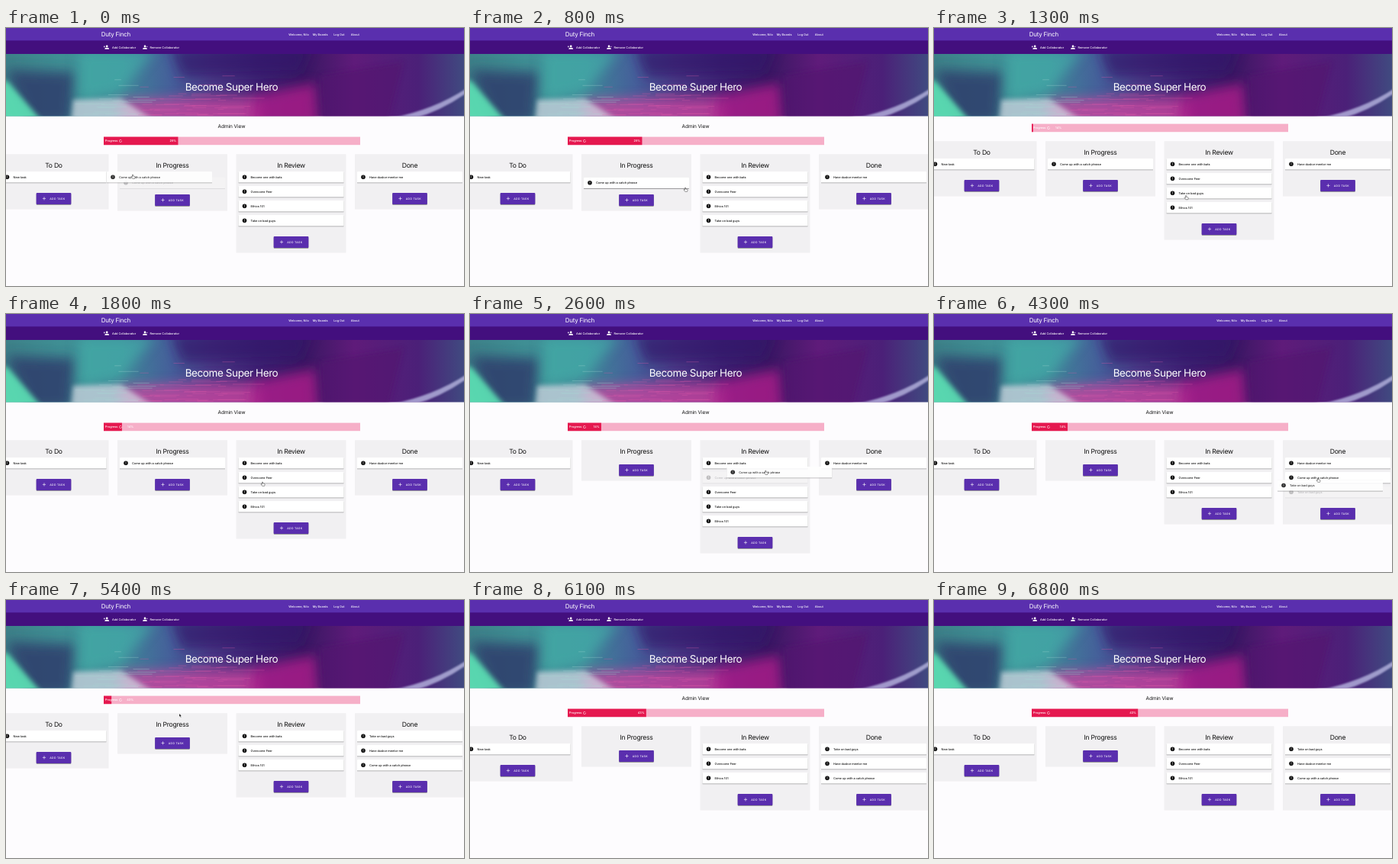
Recreate the animation shown at these times as an HTML page. Size 600 by 338 pixels, loop 6.9 s.

```html
<!DOCTYPE html>
<html lang="en">
<head>
<meta charset="utf-8">
<title>Task board</title>
<style>
  html, body { margin: 0; width: 100%; height: 100%; overflow: hidden; background: #fdfcfe; }
  svg { display: block; width: 100vw; height: 100vh; }
  text { font-family: Inter, Roboto, sans-serif; text-rendering: geometricPrecision; }
</style>
</head>
<body>
<svg id="stage" viewBox="0 0 600 338" preserveAspectRatio="none">
  <defs>
    <filter id="lift" x="-10%" y="-30%" width="120%" height="180%">
      <feDropShadow dx="0" dy=".6" stdDeviation=".75" flood-opacity=".6"/>
    </filter>
    <filter id="soft" x="-50%" y="-50%" width="200%" height="200%"><feGaussianBlur stdDeviation="8"/></filter>
    <filter id="haze" x="-50%" y="-50%" width="200%" height="200%"><feGaussianBlur stdDeviation="3"/></filter>
    <filter id="edge" x="-50%" y="-50%" width="200%" height="200%"><feGaussianBlur stdDeviation=".9"/></filter>
    <linearGradient id="sky">
      <stop offset="0" stop-color="#3d8088"/><stop offset=".12" stop-color="#3f8f94"/>
      <stop offset=".25" stop-color="#3f8798"/><stop offset=".36" stop-color="#455f9a"/>
      <stop offset=".45" stop-color="#4a3a86"/><stop offset=".55" stop-color="#3d2172"/>
      <stop offset=".65" stop-color="#381762"/><stop offset=".76" stop-color="#5f1b7a"/>
      <stop offset=".9" stop-color="#4b2078"/><stop offset="1" stop-color="#404a80"/>
    </linearGradient>
    <clipPath id="bannerClip"><rect y="34" width="600" height="81.5"/></clipPath>
  </defs>
  <g id="banner" clip-path="url(#bannerClip)"></g>
  <g id="header"></g>
  <g id="board"></g>
</svg>
<script>
const LOOP = 6900, STEP = 100;
const RELOADS = [1184, 5228], FILL_TIME = 2070, ADMIN_DELAY = 340;
const PURPLE = '#5a2fae';
const byId = id => document.getElementById(id);

const rect = (x, y, w, h, fill, extra = '') =>
  `<rect x="${x}" y="${y}" width="${w}" height="${h}" fill="${fill}" ${extra}/>`;
const text = (x, y, size, str, fill = '#111', extra = '') =>
  `<text x="${x}" y="${y}" font-size="${size}" fill="${fill}" ${extra}>${str}</text>`;
const centered = 'text-anchor="middle" letter-spacing="-.03em"';
const medium = 'font-weight="500"';

// Banner: light beams in teal, navy and magenta with fine horizontal streaks
function drawBanner() {
  const beam = (path, fill, opacity, filter = 'soft') =>
    `<path d="M${path}z" fill="${fill}" opacity="${opacity}" filter="url(#${filter})"/>`;
  let seed = 7;
  const random = () => (seed = seed * 16807 % 2147483647) / 2147483647;
  let streaks = '';
  for (let i = 0; i < 60; i++) {
    const depth = Math.sqrt(random()), x = 90 + random() * 210;
    streaks += rect(x, 62 + depth * 53, 6 + random() * 36, .8, x < 170 ? '#a9d4d3' : '#e05aa8', 'opacity=".4"');
  }
  byId('banner').innerHTML =
    rect(0, 34, 600, 82, 'url(#sky)') +
    beam('0,55 90,58 85,125 30,125', '#2f3d6c', .85) +
    beam('95,30 195,30 150,85 95,95', '#45b5ac', .6) +
    beam('215,25 400,25 385,60 230,64', '#32186a', .7) +
    beam('150,94 330,90 335,130 150,130', '#c8459f', .8) +
    beam('325,88 405,72 410,130 320,130', '#b81e8e', .75) +
    beam('412,62 520,45 500,125 415,125', '#52186f', .65, 'haze') +
    beam('88,94 150,92 200,125 85,125', '#cfd6e0', .75, 'haze') +
    beam('-20,64 2,70 50,125 -20,125', '#5ce0b4', .9, 'haze') +
    beam('500,119Q560,108 605,78V84Q565,112 525,121', '#b7b6e0', .8, 'edge') +
    streaks;
}

function drawHeader() {
  const person = (x, mark) => `<g transform="translate(${x} 25.2)" fill="#fff">
    <circle cx="1" cy="-1.3" r="1.35"/><path d="M-1.8 2.5v-.8Q-1.8.5 1 .5t2.8 1.2v.8z"/>
    <path d="${mark}" fill="none" stroke="#fff" stroke-width=".6"/></g>`;
  const nav = [[370.3, 'Welcome, Nilo'], [401.8, 'My Boards'], [429.2, 'Log Out'], [451.8, 'About']];
  byId('header').innerHTML =
    rect(0, 0, 600, 34, '#430f7e') + rect(0, 0, 600, 16.4, PURPLE) +
    text(124.7, 11.4, 8, 'Duty Finch', '#fff', 'letter-spacing="-.03em"') +
    nav.map(([x, label]) => text(x, 9.7, 3.85, label, '#fff', medium)).join('') +
    person(131.2, 'M-3.4 -.8h2.2M-2.3 -1.9v2.2') + text(139, 26.7, 3.85, 'Add Collaborator', '#fff', medium) +
    person(181, 'M2.6 -.8h2') + text(188.6, 26.7, 3.85, 'Remove Collaborator', '#fff', medium) +
    text(295.5, 81.8, 13.5, 'Become Super Hero', '#fff', centered);
}

const TASKS = {
  fresh: 'New task', phrase: 'Come up with a catch phrase', bats: 'Become one with bats',
  fear: 'Overcome Feer', ethics: 'Ethics 101', villains: 'Take on bad guys', mentor: 'Have duskor mentor me'
};

function card(x, y, task, opacity = 1) {
  return `<g transform="translate(${x} ${y})" opacity="${opacity}">
    ${rect(0, 0, 138, 14.3, '#fff', 'rx=".6" filter="url(#lift)"')}
    <circle cx="8" cy="7.2" r="2.8" fill="#111"/>
    <path d="M8 5.6v1.9M8 8.1v.7" stroke="#fff" stroke-width=".55"/>
    ${text(16, 8.6, 3.88, TASKS[task], '#111', medium)}</g>`;
}

function column(index, title, tasks, held, gap) {
  const x = -9.5 + index * 155.5, mid = x + 72, drop = gap ? 2 : 0;
  const buttonY = 198 + 19 * tasks.length + drop;
  return rect(x, 165.3, 144, 53.2 + 19 * tasks.length + drop, '#f1f0f2') +
    text(mid, 182.6, 8.6, title, '#111', centered) +
    tasks.map((task, i) => card(x + 3, 188 + 19 * i + (gap ? 7.6 : 0), task, task === held ? .22 : 1)).join('') +
    rect(mid - 22.8, buttonY - .9, 45.6, 14.8, PURPLE, 'rx=".9" filter="url(#lift)"') +
    `<path d="M${mid - 14.6} ${buttonY + 6.4}h4.2m-2.1 -2.1v4.2" stroke="#fff" stroke-width=".6"/>` +
    text(mid - 5.2, buttonY + 7.8, 3.5, 'ADD TASK', '#fff', 'font-weight="500" letter-spacing=".0892em"');
}

function progressBar(percent, width) {
  const end = 128 + width * 3.36;
  return rect(128, 142.6, 336, 10.6, '#f6afc8') + rect(128, 142.6, end - 128, 10.6, '#e5184f') +
    text(130, 149.4, 3.85, 'Progress', '#fff', medium) +
    '<circle cx="150" cy="148" r="1.6" fill="none" stroke="#fff" stroke-width=".5" stroke-dasharray="8.4 1.6"/>' +
    text(Math.max(end - 2.3, 167), 149.4, 3.85, percent + '%', '#fff', 'font-weight="500" text-anchor="end"');
}

// Cubic ease (.25, .1, .25, 1)
function ease(u) {
  if (u >= 1) return 1;
  const curve = (s, a, b) => 3 * (1 - s) ** 2 * s * a + 3 * (1 - s) * s * s * b + s ** 3;
  let low = 0, high = 1;
  for (let i = 0; i < 20; i++) {
    const s = (low + high) / 2;
    if (curve(s, .25, .25) < u) low = s; else high = s;
  }
  return curve(low, .1, 1);
}

// Pointer path: time, x, y
const PATH = [
  [0, 166, 194], [500, 184, 201], [800, 282, 211], [1500, 342, 224], [1800, 336, 222], [2150, 200, 195],
  [2500, 345, 205], [2800, 508, 213], [3000, 505, 214], [3500, 357, 223], [3650, 357, 226],
  [4300, 503, 217], [4600, 508, 227], [5000, 400, 195], [5400, 227, 149], [5800, 190, -10], [6900, 190, -10]
];

function pointerAt(t) {
  const i = PATH.findIndex(([time]) => time > t);
  const [t0, x0, y0] = PATH[i - 1], [t1, x1, y1] = PATH[i];
  const u = (t - t0) / (t1 - t0), k = u * u * (3 - 2 * u);
  return [x0 + (x1 - x0) * k, y0 + (y1 - y0) * k];
}

// Drags: start, end, task, grip inside the card
const DRAGS = [
  [0, 500, 'phrase', 34, 6], [2200, 2900, 'phrase', 51, 7], [3700, 4600, 'villains', 53, -.3]
];

function listsAt(t) {
  const todo = ['fresh'], progress = [], review = ['bats', 'fear'], done = ['mentor'];
  review.push(...(t < RELOADS[0] ? ['ethics', 'villains'] : ['villains', 'ethics']));
  if (t < 2400) progress.push('phrase');
  else if (t < 2700) review.splice(1, 0, 'phrase');
  else done.push('phrase');
  if (t >= 4000) {
    review.splice(review.indexOf('villains'), 1);
    if (t < RELOADS[1]) done.push('villains'); else done.unshift('villains');
  }
  return [todo, progress, review, done];
}

function pointer(x, y, arrow) {
  const shape = arrow
    ? '<path d="M0 0v4l1-.9.8 1.6.7-.3-.8-1.6h1.2z" fill="#111" stroke="#fff" stroke-width=".25"/>'
    : '<path d="M-.5 -1.8q.5-.6 1 0v1.7l2.2.6q.6.2.4 1l-.5 1.8h-2.9l-1.8-2.4q.2-.8 1.1-.2l.5.4z" fill="#fff" stroke="#333" stroke-width=".5"/>';
  return `<g transform="translate(${x} ${y})">${shape}</g>`;
}

function draw(t) {
  const reload = RELOADS.filter(start => t >= start).pop();
  const loading = reload !== undefined && t < reload + ADMIN_DELAY;
  const percent = t < RELOADS[0] ? 29 : t < RELOADS[1] ? 14 : 43;
  const width = reload === undefined ? percent : percent * ease((t - reload) / FILL_TIME);
  const drag = DRAGS.find(([start, end]) => t >= start && t < end);
  const [x, y] = pointerAt(t);
  const titles = ['To Do', 'In Progress', 'In Review', 'Done'];
  const columns = listsAt(t).map((tasks, i) =>
    column(i, titles[i], tasks, drag && drag[2], i === 1 && t < RELOADS[0]));
  byId('board').innerHTML =
    (loading ? '' : text(295.5, 130.9, 6.5, 'Admin View', '#111', 'text-anchor="middle" letter-spacing="-.01em"')) +
    `<g transform="translate(0 ${loading ? -17 : 0})">${progressBar(percent, width)}${columns.join('')}</g>` +
    (drag ? card(x - drag[3], y - drag[4], drag[2], .88) : '') +
    pointer(x, y, t >= 5000);
}

let shown = -1;
function tick(now) {
  const t = Math.floor(now % LOOP / STEP) * STEP;
  if (t !== shown) draw(shown = t);
  requestAnimationFrame(tick);
}

drawBanner();
drawHeader();
draw(0);
requestAnimationFrame(tick);
</script>
</body>
</html>
```
